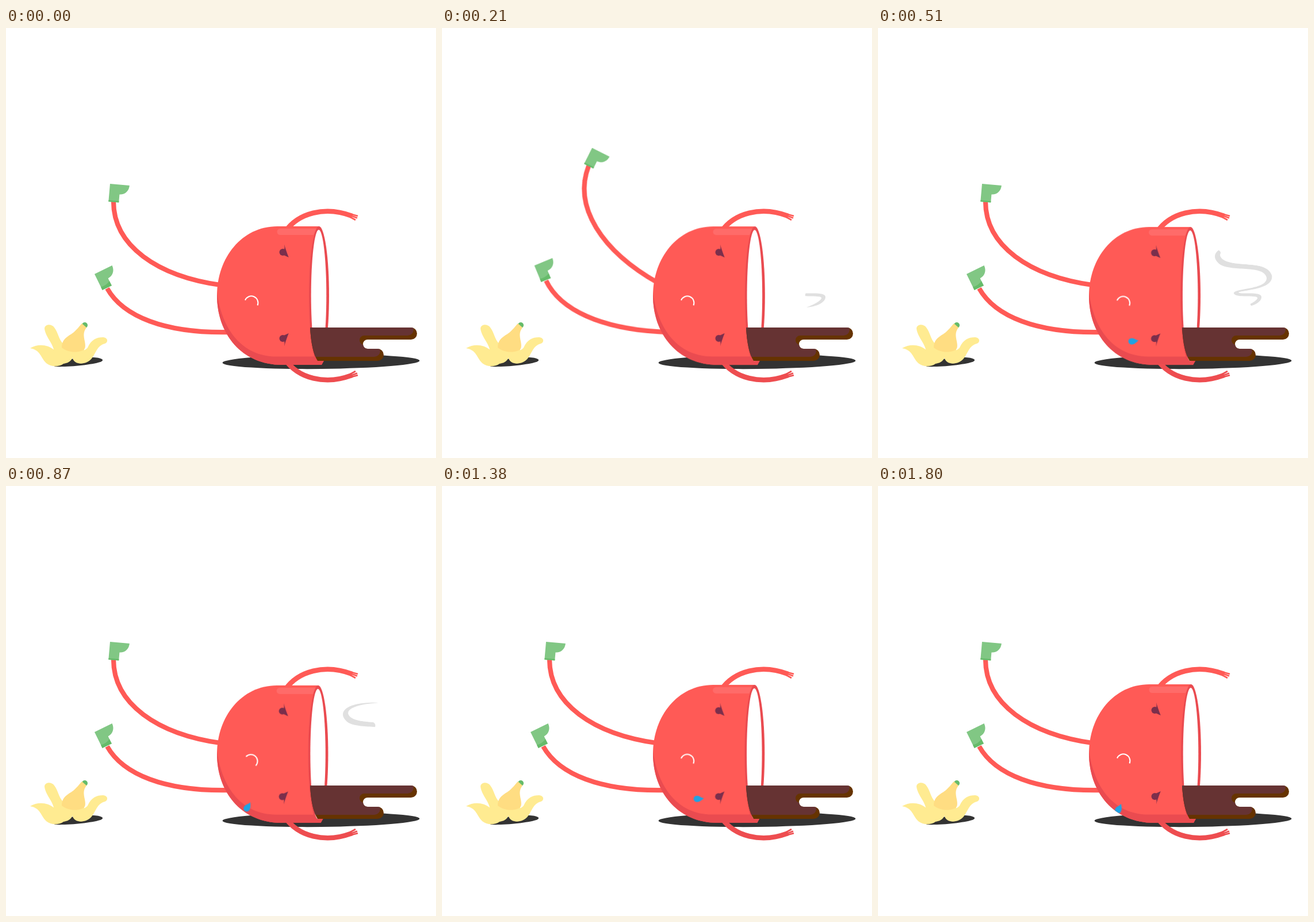
These frames come from a looping animation (748 px wide and 748 px high, 1.83 s). An HTML page:

```html
<!DOCTYPE html>
<html lang="en">
<head>
<meta charset="utf-8">
<title>Spilled cup</title>
<style>
  html, body { margin: 0; width: 100%; height: 100%; overflow: hidden; background: #fff; }
  svg { display: block; width: 100vw; height: 100vh; }

  .light { fill: #ff5a56; }
  .dark { fill: #ea4b50; }
  .limb { fill: none; stroke: #ff5a56; stroke-width: 8.2; }
  .arm { color: #ff5a56; }
  .arm.low { color: #ee4d50; }
  .peel { fill: #ffeb91; }
  .ink { fill: #7b2f4c; }
  .ground { fill: #333; }
  .boot { fill: #81c784; }
  .cuff { fill: #66bb6a; }

  .kick-low, .kick-high, .cup, .mouth, .tear, .open, .shut, .trail {
    animation: 1830ms linear infinite;
  }

  .kick-low { transform-origin: 390px 525px; animation-name: kick-low; animation-timing-function: ease-in-out; }
  @keyframes kick-low {
    0%, 13.1%, 100% { transform: rotate(0deg); }
    6.56% { transform: rotate(30.7deg); }
  }

  .kick-high { transform-origin: 385px 450px; animation-name: kick-high; animation-timing-function: ease-in-out; }
  @keyframes kick-high {
    0%, 3.28%, 16.4%, 100% { transform: rotate(0deg); }
    9.84% { transform: rotate(25deg); }
  }

  .cup { transform-origin: 367px 585px; animation-name: breathe; animation-timing-function: ease-in-out; }
  @keyframes breathe {
    50% { transform: scale(.992, .992); }
  }

  .mouth { transform-origin: 427px 477px; animation-name: pout; animation-timing-function: ease-in-out; }
  @keyframes pout {
    0%, 28%, 74%, 100% { transform: rotate(0deg); }
    47.5% { transform: rotate(20deg); }
  }

  .open { animation-name: open; animation-timing-function: step-end; }
  .shut { animation-name: shut; animation-timing-function: step-end; }
  @keyframes open {
    0%, 21.3%, 100% { opacity: 1; }
    13.1% { opacity: 0; }
  }
  @keyframes shut {
    0%, 21.3%, 100% { opacity: 0; }
    13.1% { opacity: 1; }
  }

  .tear { fill: #1fa3e3; animation-name: tear; }
  .first { animation-delay: -1380ms; }
  .second { animation-delay: -480ms; }
  @keyframes tear {
    0% { transform: translate(449px, 544px) rotate(0deg) scale(0); }
    1.64% { transform: translate(446px, 544px) rotate(0deg) scale(1); }
    13.1% { transform: translate(431px, 549px) rotate(-25deg) scale(1); }
    22.95% { transform: translate(420.5px, 558.5px) rotate(-55deg) scale(1); }
    26.2% { transform: translate(417px, 565px) rotate(-65deg) scale(1); }
    26.21%, 100% { transform: translate(417px, 565px) rotate(-65deg) scale(0); }
  }

  /* The head of the trail leads, the tail follows later. */
  .trail { fill: none; stroke: #fff; stroke-width: 12; stroke-linecap: round; animation-name: trail; }
  @keyframes trail {
    0%, 7.1% { stroke-dasharray: 0 200; stroke-dashoffset: 0; stroke-opacity: 0; }
    7.2% { stroke-opacity: 1; }
    16.4% { stroke-dasharray: 42 200; }
    25.7% { stroke-dasharray: 73.6 200; stroke-dashoffset: 0; }
    33.6% { stroke-dasharray: 77.3 200; stroke-dashoffset: -22.7; }
    60.6% { stroke-opacity: 1; }
    60.7%, 100% { stroke-dasharray: 0 200; stroke-dashoffset: -100; stroke-opacity: 0; }
  }
</style>
</head>
<body>
<svg viewBox="0 0 748 748">
  <defs>
    <path id="bowl" d="M545 345H472C410 345 367 400 367 465C367 532 410 586 480 586H549L555 575Z"/>
    <clipPath id="in-bowl"><use href="#bowl"/></clipPath>

    <path id="spill" d="M529 521H704.500A10.500 10.500 0 0 1 704.500 542H629A8 8 0 0 0 629 558H646.500A10.500 10.500 0 0 1 646.500 579H542Q531 562 529 521Z"/>
    <clipPath id="in-spill"><use href="#spill"/></clipPath>

    <mask id="reveal" maskUnits="userSpaceOnUse" x="560" y="350" width="160" height="160">
      <path class="trail" pathLength="100" d="M634 486C650 482 666 476 664 468C661 461 625 468 622 461C619 453 683 456 681 433C676 409 618 424 597 407C578 391 594 379 648 378"/>
    </mask>

    <g id="arm">
      <path d="M486 354C508 322 555 309 602 327" fill="none" stroke="currentColor" stroke-width="8.500"/>
      <path d="M599 323.500L612 327M600 326.500L611 330.500M599 329L608 334" fill="none" stroke="currentColor" stroke-width="2.800"/>
    </g>

    <g id="boot">
      <path class="boot" d="M0 0H34C34 10 27 17 18 17V31H0Z"/>
      <path class="cuff" d="M0 28.500H18V31H0Z"/>
    </g>

    <g id="eye">
      <circle cx="481.500" cy="390" r="6"/>
      <path d="M484 376.500Q488 390 491.800 399Q485 396 481 394Q486 386 484 376.500Z"/>
    </g>
    <path id="lid" d="M484.500 376Q480 391 492 398.500Q485 389 484.500 376Z"/>

    <path id="drop" d="M10 -1C4 -2 3 -5.500 -2.500 -5.500A5.500 5.500 0 0 0 -2.500 5.500C3 5.500 6 2 10 -1Z"/>
  </defs>

  <!-- Banana peel -->
  <path class="ground" d="M84 589C92 577 125 572 153 573C168 574 172 578 164 581C148 586 110 590 84 589Z"/>
  <g class="peel">
    <path d="M67 523C67 515 79 514 84 521C91 530 91 541 100 550L100 570L84 566C84 550 69 539 67 523Z"/>
    <path d="M42 557C55 549 72 550 84 560L100 556C112 562 118 572 115 575C110 583 104 583 100 584C92 590 78 590 70 583C60 573 60 560 42 557Z"/>
    <path d="M116 573C125 562 138 562 142 556C148 542 158 538 168 538C178 538 178 547 172 549C158 553 157 565 149 575C140 586 120 587 116 575Z"/>
    <path d="M100 555H136V566L116 574L100 566Z"/>
  </g>
  <circle cx="137" cy="517" r="5" class="cuff"/>
  <path fill="#ffdd82" d="M97 556C97 540 109 536 117 530C125 523 128 518 132 514L140 521C134 529 135 535 137 545C139 556 138 560 130 562C118 566 104 562 97 556Z"/>

  <ellipse class="ground" cx="548" cy="580.500" rx="171.500" ry="12.500" transform="rotate(-.6 548 580.500)"/>

  <!-- Limbs -->
  <g class="kick-low">
    <path class="limb" d="M176 453C203 501 275 532 392 529"/>
    <g transform="translate(154 428) rotate(-26)">
      <use href="#boot"/>
      <path class="cuff" d="M0 25Q10 27 18 22V31H0Z"/>
    </g>
  </g>
  <g class="kick-high">
    <path class="limb" d="M187 302C187 378 262 432 376 447.500"/>
    <use href="#boot" transform="translate(181 271) rotate(5)"/>
  </g>
  <use href="#arm" class="arm"/>
  <use href="#arm" class="arm low" transform="translate(0 931) scale(1 -1)"/>

  <!-- Cup -->
  <g class="cup">
    <use href="#bowl" class="light"/>
    <g clip-path="url(#in-bowl)">
      <path class="dark" d="M366 450C372 520 408 571 470 571.500H560V590H366Z"/>
      <path fill="#ff6b69" d="M477 349H540L535 360H477A5.500 5.500 0 0 1 477 349Z"/>
    </g>
    <ellipse class="dark" cx="544.500" cy="465" rx="17.500" ry="120"/>
    <ellipse fill="#fff" cx="544" cy="465" rx="13.300" ry="114"/>
    <g class="ink">
      <g class="open">
        <use href="#eye"/>
        <use href="#eye" transform="translate(0 930) scale(1 -1)"/>
      </g>
      <g class="shut">
        <use href="#lid"/>
        <use href="#lid" transform="translate(0 930) scale(1 -1)"/>
      </g>
    </g>
    <path class="mouth" d="M416 473.500A11.600 11.600 0 0 1 437.500 482.500" fill="none" stroke="#fff" stroke-width="2"/>
    <g clip-path="url(#in-bowl)">
      <use href="#drop" class="tear first"/>
      <use href="#drop" class="tear second"/>
    </g>
  </g>

  <!-- Coffee -->
  <use href="#spill" fill="#663300"/>
  <g clip-path="url(#in-spill)">
    <use href="#spill" fill="#663333" transform="translate(-6 -7)"/>
    <path fill="#663333" d="M528 521H560V572H538Z"/>
  </g>

  <path fill="#e0e0e0" mask="url(#reveal)" d="M634 486C650 480 661 473 660 469C657 464 624 470 619 462C617 452 678 456 676 434C671 412 618 424 596 412C574 396 588 375 648 377C606 380 588 389 598 401C616 418 676 402 685 430C690 456 630 456 627 460C632 464 664 458 667 467C668 478 650 485 634 486Z"/>
</svg>
</body>
</html>
```
